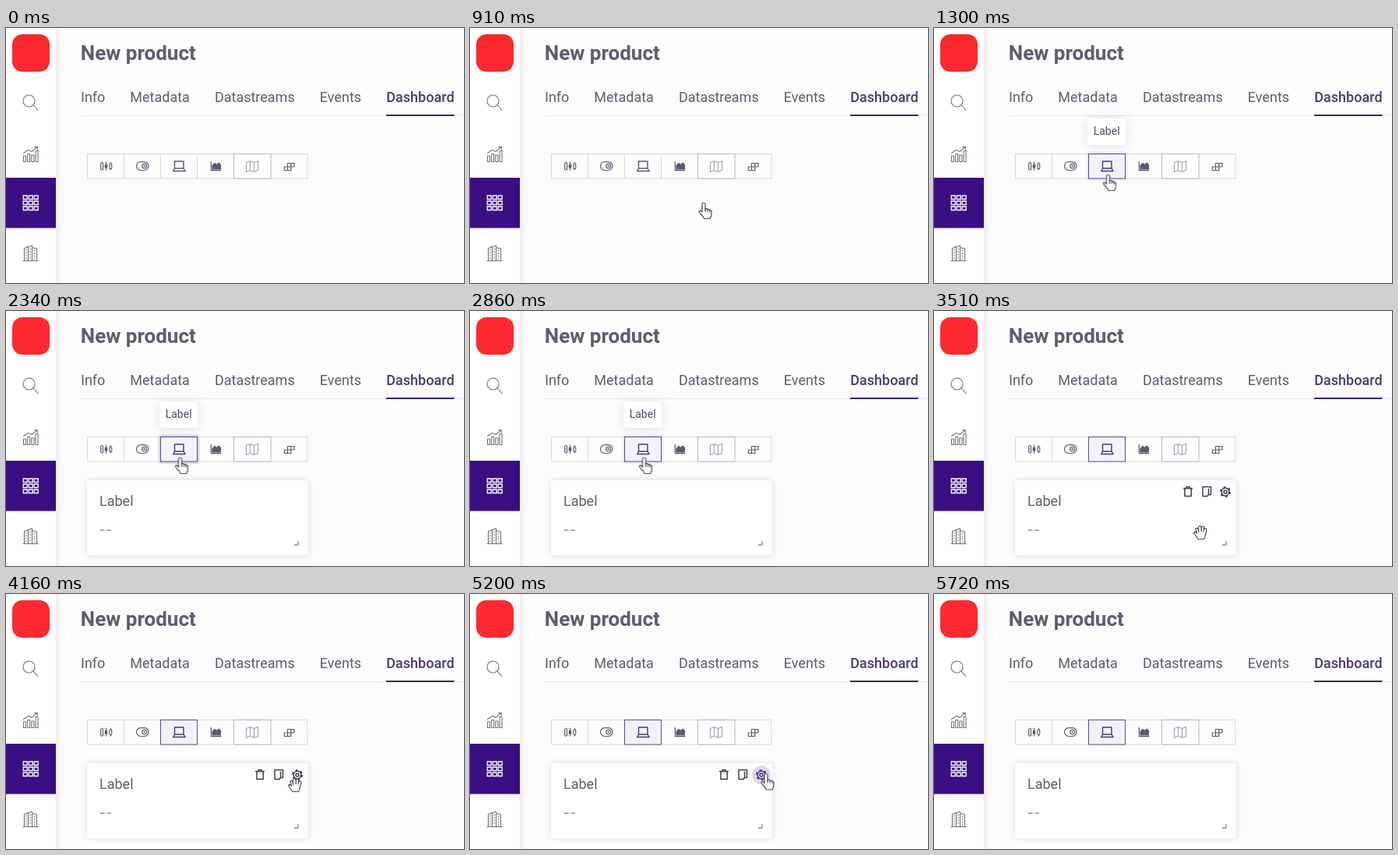
Write an HTML page that moves like this. It is 588 px wide and 327 px high and loops after 6.24 s.

```html
<!DOCTYPE html>
<html lang="en">
<head>
<meta charset="utf-8">
<title>New product dashboard</title>
<style>
  html, body { margin: 0; width: 100%; height: 100%; overflow: hidden; background: #fefdfe; }
  svg { display: block; width: 588px; height: 327px; font-family: Roboto, sans-serif; }
  .line { fill: none; stroke: #5f5870; stroke-width: 1.2; stroke-linejoin: round; }
  .nav { fill: none; stroke: #737078; stroke-width: 1.1; stroke-linejoin: round; stroke-linecap: round; }
  .tabs { font-size: 18px; fill: #62586f; }
  .cell { fill: #fefefe; stroke: #dad6e0; }
  .card { filter: drop-shadow(0 0 4px rgba(40, 30, 60, .16)); }
  .tip { filter: drop-shadow(0 1px 7px rgba(40, 30, 60, .15)); }
  .side { filter: drop-shadow(1px 0 5px rgba(40, 30, 60, .14)); }
  .cursor path { fill: #fff; stroke: #4a4850; stroke-width: 1.2; stroke-linejoin: round; stroke-linecap: round; }

  /* One tick is 130 ms, 1/48 of the loop */
  .anim { animation: 6240ms step-end infinite; }
  .hidden { opacity: 0; }
  .hand { animation-name: hand; }
  .grab { animation-name: grab; }
  .tip { animation-name: tip; }
  .glow { animation-name: glow; }
  .pick { animation-name: pick; }
  .laptop { animation-name: ink; }
  .card { animation-name: card; }
  .tools { animation-name: tools; }
  .halo { animation-name: halo; }
  .gear { animation-name: ink-gear; }

  @keyframes hand {
    0% { opacity: 0; transform: translate(440px, 268px); }
    12.5% { opacity: 1; transform: translate(400px, 258px); }
    14.58% { opacity: 1; transform: translate(300px, 224px); }
    16.66% { opacity: 1; transform: translate(238px, 195px); }
    18.75% { opacity: 1; transform: translate(223.5px, 188px); }
    50% { opacity: 1; transform: translate(256px, 212px); }
    52.08% { opacity: 0; transform: translate(256px, 212px); }
    68.75% { opacity: 1; transform: translate(380px, 230.5px); }
    85.41% { opacity: 1; transform: translate(434px, 248px); }
    87.5% { opacity: 1; transform: translate(520px, 268px); }
    89.58%, 100% { opacity: 0; transform: translate(520px, 268px); }
  }
  @keyframes grab {
    0% { opacity: 0; transform: translate(315px, 262px); }
    52.08% { opacity: 1; transform: translate(315px, 262px); }
    54.16% { opacity: 1; transform: translate(338px, 281px); }
    56.25% { opacity: 1; transform: translate(342px, 284px); }
    62.5% { opacity: 1; transform: translate(349px, 273px); }
    64.58% { opacity: 1; transform: translate(361px, 257px); }
    66.66% { opacity: 1; transform: translate(371px, 245px); }
    68.75%, 100% { opacity: 0; transform: translate(371px, 245px); }
  }
  @keyframes tip {
    0% { opacity: 0; } 18.75% { opacity: .6; } 20.83% { opacity: 1; }
    50% { opacity: .4; } 52.08%, 100% { opacity: 0; }
  }
  @keyframes glow {
    0% { opacity: 0; } 18.75% { opacity: .5; } 33.33% { opacity: 1; }
    43.75% { opacity: .5; } 50%, 100% { opacity: 0; }
  }
  @keyframes pick { 0% { opacity: 0; } 18.75%, 100% { opacity: 1; } }
  @keyframes ink { 0% { stroke: #5f5870; } 18.75%, 100% { stroke: #493483; } }
  @keyframes card { 0% { opacity: 0; } 35.41% { opacity: .6; } 37.5%, 100% { opacity: 1; } }
  @keyframes tools { 0% { opacity: 0; } 52.08% { opacity: 1; } 85.41%, 100% { opacity: 0; } }
  @keyframes halo { 0% { opacity: 0; } 68.75% { opacity: 1; } 85.41%, 100% { opacity: 0; } }
  @keyframes ink-gear { 0% { stroke: #403a4c; } 68.75% { stroke: #493483; } 85.41%, 100% { stroke: #403a4c; } }
</style>
</head>
<body>
<svg viewBox="0 0 588 327">
  <rect width="588" height="327" fill="#fefdfe"/>

  <!-- Sidebar -->
  <rect class="side" y="-20" width="64" height="367" fill="#fff"/>
  <rect x="8" y="8" width="48" height="48" rx="13" fill="#fc2a2e"/>
  <g class="nav">
    <circle cx="29.5" cy="93.5" r="7.5"/>
    <path d="M35 99l6 6.5"/>
    <path d="M22.5 164h3v7.500h-3zM27.700 161.500h3v10h-3zM32.900 163h3v8.500h-3zM38 157.500h3v14h-3z"/>
    <path d="M22.500 160.500l6-4 4.500 2 7-6M36.800 152.500h3.500v3.500"/>
    <path d="M22 298.500h19M23.500 298.500v-16l5-2v18M28.500 280.500l5-1.500v19.500M33.500 281.500l6 1.500v15.500"/>
    <path d="M26 284v12M31 283v13M36.500 285v11" stroke-dasharray="1 2.500"/>
  </g>
  <rect y="192" width="64" height="64.500" fill="#390f82"/>
  <g fill="none" stroke="#fff" stroke-width="1.300">
    <path id="row" d="M22.200 215h5v4.500h-5zM29.200 215h5v4.500h-5zM36.200 215h5v4.500h-5z"/>
    <path d="M22.200 222h5v4.500h-5zM29.200 222h5v4.500h-5zM36.200 222h5v4.500h-5z"/>
    <path d="M22.200 229h5v4.500h-5zM29.200 229h5v4.500h-5zM36.200 229h5v4.500h-5z"/>
  </g>

  <!-- Heading and tabs -->
  <text x="95.800" y="41" font-size="26" font-weight="700" fill="#625a70">New product</text>
  <g class="tabs">
    <text x="96" y="95">Info</text>
    <text x="159.300" y="95">Metadata</text>
    <text x="267.900" y="95">Datastreams</text>
    <text x="402.800" y="95">Events</text>
    <text x="488.300" y="95" font-weight="500" fill="#4c3878">Dashboard</text>
  </g>
  <path d="M96 112.500h492" stroke="#e8e6ec"/>
  <path d="M488 112h87.500" stroke="#3c2080" stroke-width="2"/>

  <!-- Widget toolbar -->
  <rect class="cell" x="104.500" y="161.500" width="282.500" height="31.500"/>
  <path d="M151.500 162v31M198.500 162v31M245.500 162v31" stroke="#dad6e0"/>
  <rect x="292.500" y="161.500" width="47.500" height="31.500" fill="#fefefe" stroke="#b7afc7"/>
  <rect class="anim hidden glow" x="197" y="160" width="50" height="34.500" rx="2" fill="none" stroke="#ddd6ec" stroke-width="3"/>
  <rect class="anim hidden pick" x="198.500" y="161.500" width="47" height="31.500" fill="#f4f2f9" stroke="#5b4a90"/>
  <g class="line">
    <rect x="121.700" y="172.500" width="2.800" height="9.500" rx="1"/>
    <path d="M128.500 172v10.500M134.300 172v10.500"/>
    <rect x="127.300" y="175.500" width="2.400" height="3.500" fill="#5f5870"/>
    <rect x="132.900" y="174" width="2.800" height="6.500" rx="1" fill="#fefefe"/>
    <rect x="167.500" y="171.700" width="15.500" height="10.800" rx="5.400"/>
    <circle cx="177.700" cy="177.100" r="2.900"/>
    <circle cx="177.700" cy="177.100" r=".6"/>
    <path class="anim laptop" stroke-width="1.400" d="M216.500 171h11.500v9h-11.500zM216.500 180l-2 3.500h15.500l-2-3.500"/>
    <path d="M263.300 171v11.700h13"/>
    <path d="M265 181v-4.500l3-3 2.500 2 3-2.500 2 2.500v5.500z" fill="#5f5870"/>
    <path stroke="#aaa5b3" d="M308.500 172.500l5-2 5 2 5-2v12l-5 2-5-2-5 2zM313.500 170.500v12M318.500 172.500v12"/>
    <path d="M361.500 173.500h8.500v4.500h-8.500zM365.800 173.500v9M357.300 178h8.500v4.500h-8.500zM361.500 178v4.500"/>
  </g>

  <!-- Tooltip -->
  <g class="anim hidden tip">
    <rect x="197" y="116" width="49.500" height="34" rx="3" fill="#fff"/>
    <text x="204.700" y="137" font-size="14" fill="#514a5d">Label</text>
  </g>

  <!-- Widget card -->
  <g class="anim hidden card">
    <rect x="104" y="217" width="284" height="96.500" rx="4" fill="#fff"/>
    <text x="120" y="250" font-size="18" fill="#625d6b">Label</text>
    <text x="120.500" y="288" font-size="24" letter-spacing="1.500" fill="#a19ea8">--</text>
    <path d="M370 300h5v-5" fill="none" stroke="#8e8b94" stroke-width="1.400"/>
  </g>
  <g class="anim hidden tools" fill="none" stroke="#403a4c" stroke-width="1.500" stroke-linejoin="round">
    <path d="M320 227.500h12M324 227v-1.500h4v1.500M322 228v9.500h8.200v-9.500"/>
    <path d="M347 225.500h8.500v10h-3M345 227.500v10h6l1.500-2v-8M345 227.500v-2h3"/>
    <circle class="anim hidden halo" cx="374" cy="232" r="12" fill="#dcd7e8" stroke="none"/>
    <g class="anim gear">
      <circle cx="374" cy="232" r="4.900"/>
      <circle cx="374" cy="232" r="6.200" stroke-width="1.800" stroke-dasharray="3 3.493"/>
      <circle cx="374" cy="232" r="2"/>
    </g>
  </g>

  <!-- Cursors -->
  <g class="cursor">
    <g class="anim hidden hand">
      <path d="M-2 2a2 2 0 0 1 4 0v6q2.400-1 3 .8 2.200-.8 2.800 1 2.200-.4 2.200 1.800v3.400q0 2.500-2 5.500H.5q-1-2.500-3-4.500-2.500-2.500-3.500-4.500-.2-2 2-1.500l2 2z"/>
      <path d="M2 8v3.500M5 9v2.500M7.800 10v2"/>
    </g>
    <g class="anim hidden grab">
      <path d="M-4.500 1L-6-4q0-2 1.700-1.700 1 .3 1.600 2.500L-2.500-6.500q.2-2 1.800-2 1.500.2 1.600 2l.6 0q.5-1.700 2-1.500 1.500.4 1.300 2l-.2 1.800q1-1.500 2.300-.9 1.300.8.9 2.400L6.500 3Q6 6 4.500 8.500H-3Q-5 5.500-8 1.500-8.800-.6-7-.6-5.800-.5-4.500 1z"/>
      <path d="M-2.700-3.200l.5 2.500M1.200-6.500v5M4.600-4.200l-.6 3"/>
    </g>
  </g>
</svg>
</body>
</html>
```
